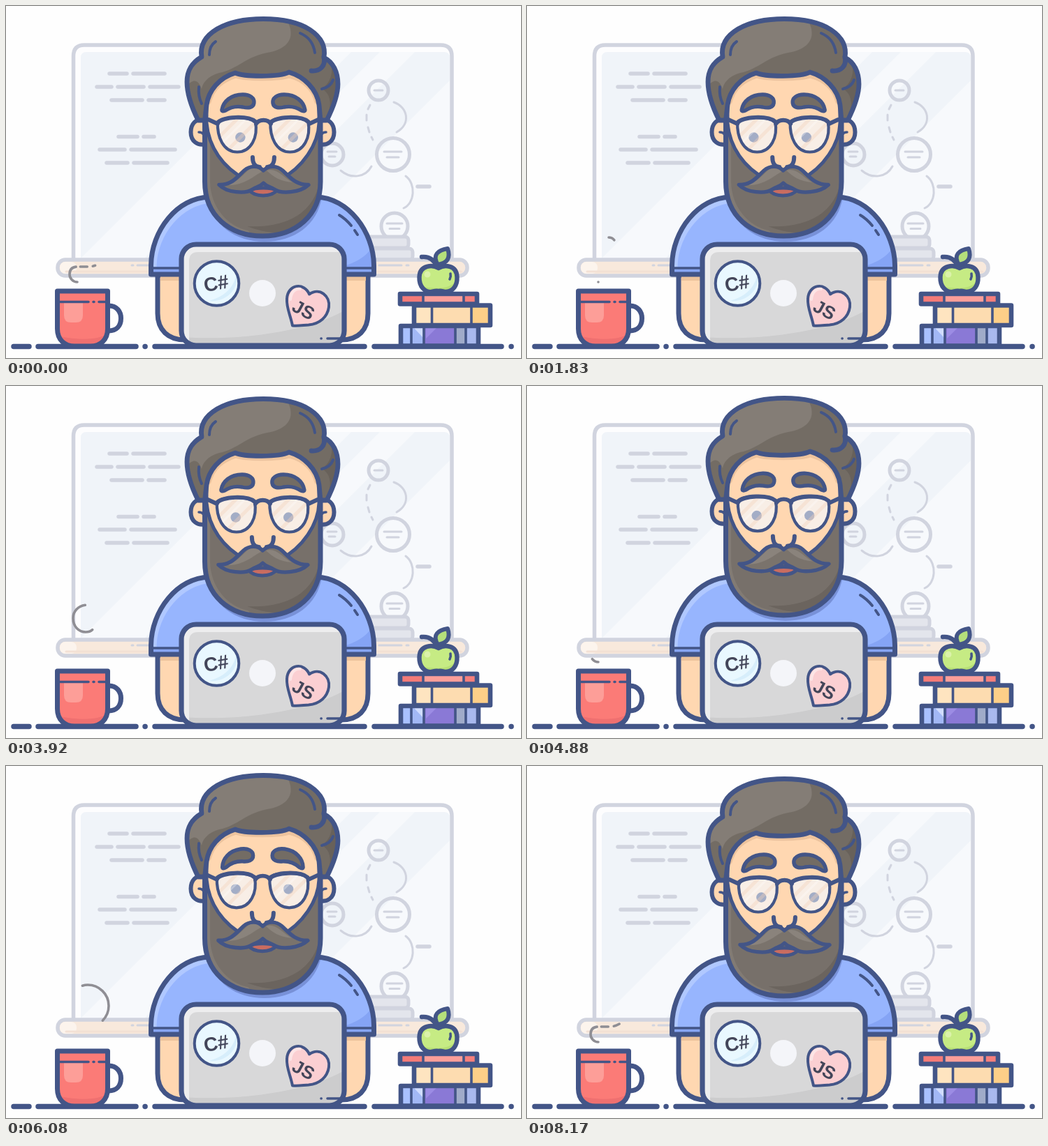
Recreate the animation shown at these times as an HTML page with a canvas. Size 737 by 505 pixels, loop 8.21 s.

```html
<!DOCTYPE html>
<html lang="en">
<head>
<meta charset="utf-8">
<title>Developer at work</title>
<style>
html, body { margin: 0; width: 100%; height: 100%; overflow: hidden; background: #fefefe; }
canvas { display: block; }
</style>
</head>
<body>
<canvas id="stage" width="737" height="505"></canvas>
<script>
const ctx = document.getElementById('stage').getContext('2d');
const LOOP = 8210;
const INK = '#435587', SKIN = '#ffd7b1', HAIR = '#736c64', HAIR_LIGHT = '#847d76';
const GREY = '#d1d4df', PALE = '#f0f4f9', SHIRT = '#97b5fe';

// ---------- drawing helpers ----------
function shape(d, fill, stroke, width) {
  const p = new Path2D(d);
  if (fill) { ctx.fillStyle = fill; ctx.fill(p); }
  if (stroke) { ctx.strokeStyle = stroke; ctx.lineWidth = width; ctx.stroke(p); }
}
const line = (d, width, color = INK) => shape(d, null, color, width);
function circle(x, y, r, fill, stroke, width) {
  ctx.beginPath();
  ctx.arc(x, y, r, 0, Math.PI * 2);
  if (fill) { ctx.fillStyle = fill; ctx.fill(); }
  if (stroke) { ctx.strokeStyle = stroke; ctx.lineWidth = width; ctx.stroke(); }
}
function box(x, y, w, h, r, fill, stroke, width) {
  ctx.beginPath();
  ctx.roundRect(x, y, w, h, r);
  if (fill) { ctx.fillStyle = fill; ctx.fill(); }
  if (stroke) { ctx.strokeStyle = stroke; ctx.lineWidth = width; ctx.stroke(); }
}
function group(fn) { ctx.save(); fn(); ctx.restore(); }
function clipTo(d, fn) {
  group(() => { ctx.clip(new Path2D(d)); fn(); });
}
function mirrored(axis, fn) {
  fn();
  group(() => { ctx.translate(axis * 2, 0); ctx.scale(-1, 1); fn(); });
}
function label(text, x, y, size, angle) {
  group(() => {
    ctx.translate(x, y);
    ctx.rotate(angle);
    ctx.font = `bold ${size}px "Liberation Sans", Arial, sans-serif`;
    ctx.textAlign = 'center';
    ctx.textBaseline = 'middle';
    ctx.fillStyle = '#434559';
    ctx.fillText(text, 0, 0);
  });
}

// ---------- timing ----------
const sine = u => 0.5 - 0.5 * Math.cos(Math.PI * Math.min(1, Math.max(0, u)));
function keyed(t, keys) {
  for (let i = 1; i < keys.length; i++) {
    const [t0, a] = keys[i - 1], [t1, b] = keys[i];
    if (t < t1) return a + (b - a) * sine((t - t0) / (t1 - t0));
  }
  return keys[keys.length - 1][1];
}
const LOOK = [[0, 5.8], [250, 5.8], [1250, -5], [2550, -5], [3450, -0.8], [7270, -0.8], [8120, 5.8]];
const LIFT = [[0, 0], [4600, 0], [5500, 1], [7270, 1], [8120, 0]];

// ---------- background ----------
function sheen(from, to) {
  shape(`M${from - 40} 40L${to - 40} 40L${to - 380} 380L${from - 380} 380Z`, 'rgba(255,255,255,.5)');
}
function board() {
  shape('M96.500 364V72Q96.500 56 112 56H622Q638 56 638 72V364Z', '#fdfdfe');
  clipTo('M107 364V74Q107 66 115 66H627Q635 66 635 74V364Z', () => {
    ctx.fillStyle = PALE;
    ctx.fillRect(90, 50, 560, 320);
    sheen(469, 560);
    sheen(601, 651);
    sheen(742, 1100);
  });
  line('M96.500 364V72Q96.500 56 112 56H622Q638 56 638 72V364', 5.5, GREY);
  line('M148 97H173M182 97H227M130 116H151M160 116H197M206 116H247M151 135H195M204 135H227' +
    'M161 187.500H188M197 187.500H212M134 206H170M179 206H242M144 225H174M183 225H231M589 259H606', 5.5, GREY);
  circle(533, 121, 14, null, GREY, 5);
  circle(554, 213, 23.5, null, GREY, 5);
  circle(467, 213, 16, null, GREY, 5);
  circle(556, 316, 19, null, GREY, 5);
  line('M527 121H539M541 209H566M545 217H562M460 209H473M462 216H471M545 312H567M549 319.500H563', 3, GREY);
  line('M555 138C575 145 580 169 559 181M521 142L518 148M516 156V164M518 174L520 181M523 188L525 192' +
    'M479 236C493 248 514 247 523 230M572 244C587 255 585 283 569 290', 3, GREY);
  box(500, 331, 76, 16, 5, '#e3e5ec', GREY, 5);
  box(500, 348, 82, 16, 5, '#e3e5ec', GREY, 5);
}
function ledge() {
  box(74, 364, 586, 23, 11, '#f8e9dc', GREY, 5.5);
  box(77, 367, 24, 17, 8, '#fcf4ed');
  line('M86 381H652', 3, '#f3e1d5');
  line('M180 372H182M188 372H206M534 372H566M573 372H576', 3, GREY);
}
function desk() {
  line('M11 488.500H33M46 488.500H186M199 488.500H199.100M213 488.500H513M527 488.500H709M723 488.500H723.100', 7.5);
}

// ---------- steam ----------
const STEAM = 'M102 396C96 396 91 391 91 385C91 378 95 374 102 374H118C134 374 147 360 147 344' +
  'C147 327 133 314 117 314C105 314 96 322 96 333C96 345 104 353 114 353C121 353 127 349 127 342C127 336 122 332 117 332';
const steamPath = new Path2D(STEAM);
const steamNode = document.createElementNS('http://www.w3.org/2000/svg', 'path');
steamNode.setAttribute('d', STEAM);
const steamLength = steamNode.getTotalLength();
const CYCLE = 2710, steamRuns = [[0, 33], [39, 49], [57, steamLength]];

function steam(age) {
  const head = sine(age / 2650) * steamLength;
  const tail = Math.max(0, (age - 1000) / 1790) * steamLength;
  ctx.strokeStyle = '#8f8e94';
  ctx.lineWidth = 3.6;
  for (const [a, b] of steamRuns) {
    const from = Math.max(a, tail), to = Math.min(b, head);
    if (to <= from) continue;
    ctx.setLineDash([to - from, 999]);
    ctx.lineDashOffset = -from;
    ctx.stroke(steamPath);
  }
  ctx.setLineDash([]);
}

// ---------- desk objects ----------
function mug() {
  const body = 'M73.500 409H145.500V463C145.500 479 135 488 121 488H98C84 488 73.500 479 73.500 463Z';
  line('M147 430C159 430 164.500 439 164.500 448C164.500 459 158 466 147 466', 7);
  shape(body, '#fb7b77');
  clipTo(body, () => {
    shape('M83 426H110V444Q110 454 100 454H93Q83 454 83 444Z', '#fd9e98');
    shape('M146 470C130 480 104 479 76 474V490H147Z', '#ef7070');
  });
  line(body, 7);
  line('M77 424.500H118M125 424.500H126M133 424.500H144', 3.6);
}
function books() {
  const blocks = [
    [565, 459, 15, 28, '#a9c1ff'], [580, 459, 19, 28, '#a2b8f5'], [599, 459, 44, 28, '#8a79d6'],
    [643, 459, 16, 28, '#a0abc9'], [659, 459, 17, 28, '#a9b9ee'],
    [584, 429, 26, 29, '#fee4c0'], [610, 429, 56, 29, '#fddcb0'], [666, 429, 27, 29, '#fdcf88'],
    [564, 413, 33, 15, '#f47b78'], [597, 413, 58, 15, '#fd9e99'], [655, 413, 19, 15, '#f67f7c']
  ];
  for (const [x, y, w, h, c] of blocks) { ctx.fillStyle = c; ctx.fillRect(x, y, w, h); }
  shape('M582 460H597V476Z', '#d0dcff');
  shape('M601 460H618L601 477Z', '#9c8ce4');
  line('M580 461V486M598 461V486M643 461V486M658 461V486M609.500 431V456M666 431V456M597 415V426M655 415V426', 3.6);
  line('M565 459H676V487.500H565Z M584 429.500H693V458H584Z M564 413H674V427.500H564Z', 6.6);
}
function apple() {
  const fruit = 'M619 376C611 371 592 371 591.500 389C591 403 600 411 609 410C613 409 616 408 619 409' +
    'C623 408 626 410 630 410C640 409 646 401 645.500 389C645 371 627 371 619 376Z';
  shape(fruit, '#c6eb84');
  clipTo(fruit, () => {
    shape('M645 392C640 404 622 407 598 403L600 415H648Z', '#b7df75');
    circle(603, 385, 4.5, '#dbf3aa');
  });
  line(fruit, 6.4);
  shape('M618 371C609 357 619 350 632 348C636 360 633 369 618 371Z', '#b4de7b', INK, 6);
  line('M595 360C604 359 612 363 617 374', 6.4);
  line('M636 384Q637 388 635 392', 3.6);
}

// ---------- body and laptop ----------
const TORSO = 'M207.500 385V372C208 322 245 275 291 274H444C490 275 526 324 526.500 372V385Z';
const JAW = 'M284.500 164V252C284.500 301 320 330 367 330C414 330 450 301 450 252V164';

function body(lift) {
  shape('M217 386V441C217 465 232 479 256 479V386Z', SKIN, INK, 7);
  shape('M518 386V441C518 465 504 479 480 479V386Z', SKIN, INK, 7);
  ctx.fillStyle = '#ecc29b';
  ctx.fillRect(221, 388, 28, 6);
  ctx.fillRect(487, 388, 28, 6);
  shape(TORSO, SHIRT);
  clipTo(TORSO, () => {
    line('M211 385V373C212 326 249 280 295 278', 9, '#b0c8ff');
    shape('M527 338C522 357 500 369 480 374V388H530Z', '#85a4f5');
    ctx.fillStyle = '#87a5f3';
    ctx.fillRect(206, 378, 324, 8);
    group(() => { ctx.translate(3, 8 - 5 * lift); shape(JAW, '#7891d8'); });
  });
  line(TORSO, 7);
  line('M210 376H248M488 376H525', 3.5);
  line('M477 300C484 304 489 309 494 315M499 322L503 328', 4);
}
function laptop() {
  box(251, 342, 233, 145, 21, '#d8d8d9');
  group(() => {
    ctx.beginPath();
    ctx.roundRect(254, 345, 227, 140, 18);
    ctx.clip();
    shape('M254 475C325 480 425 470 484 437V490H254Z', '#cccccd');
    line('M258 490V366Q258 349 275 349H490', 8, '#ededee');
  });
  box(251, 342, 233, 145, 21, null, INK, 7.2);
  line('M451 477H451.200M460 477H482', 3.6);
  circle(367, 412, 19, '#f4f5f9');

  circle(301.500, 398, 31.8, '#e9f8ff');
  shape('M330 383C334 404 318 425 291 423C315 416 327 402 330 383Z', '#d7eefb');
  circle(301.500, 398, 31.8, null, INK, 4);
  label('C#', 301, 399.5, 28, -0.17);

  shape('M410 458.500C407 443 401 433 402 420C403 399 427 396 434 413.500C449 403 464 416 462 432' +
    'C460 446 449 456 433 457.500C425 458 417 459.500 410 458.500Z', '#fbcfd2', INK, 4);
  line('M407 421C408 410 414 405 421 406', 4, '#fde5e6');
  label('JS', 425, 437.5, 26, 0.5);
}

// ---------- head ----------
function face() {
  mirrored(367, () => {
    shape('M286 163C271 160 264.500 170 264.500 181C264.500 194 274 201 286 198Z', SKIN, INK, 6);
    line('M276 181Q281 181 283 185', 3.6);
  });
  shape(JAW, '#77706a');
  clipTo(JAW, () => {
    line('M289 190V252C290 290 314 318 345 325', 6, '#827b74');
    shape('M450 240C447 296 402 319 345 316C380 330 420 330 455 300Z', '#6b645e');
  });
  const skin = 'M287 168V140C290 112 315 94 330 94H405C425 98 446 116 448 140V168C447 198 425 232 392 249' +
    'Q367 258 343 249C310 232 290 202 287 168Z';
  shape(skin, SKIN, INK, 5);
  line(JAW, 7);
  line('M291 138C297 117 309 108 329 101C342 106 392 106 405 101C425 106 439 118 444 138', 5, '#edc39d');
}
function hair() {
  const mass = 'M284.500 164H275C268 150 259 130 259 109C259 90 268 80 280 73C277 55 287 42 302 33' +
    'C321 22 345 18.500 368 18.500C393 18.500 418 23 435 34C450 44 458 57 455 74C468 80 475 95 475 112C475 130 466 150 459 164H450' +
    'L448 142C445 119 426 101 405 95C391 102 342 102 328 96C305 103 290 121 287 142Z';
  shape(mass, HAIR);
  clipTo(mass, () => {
    shape('M255 120C261 88 280 75 277 62L290 15H399C417 43 405 60 379 66C342 72 332 91 305 96' +
      'C288 101 281 111 280 119C275 105 267 102 255 120Z', HAIR_LIGHT);
    shape('M462 76C471 91 465 110 452 119C463 124 467 139 461 153L479 135V85Z', '#68615a');
  });
  line(mass, 6.8);
  line('M455 73C458 86 449 94 437 93', 6.8);
  line('M291 70C291 61 294 55 300 51M421 39C433 44 440 53 442 67M276 116C275 126 277 134 280 140M452 119C460 117 466 112 468 106', 4);
}
function brows(lift) {
  mirrored(367.5, () => group(() => {
    ctx.translate(332, 139 - lift);
    ctx.rotate(-0.15 * lift);
    shape('M-24 10C-22 -2 -11 -12 6 -12C16 -12 23 -7 22 0C21 7 14 8 6 6C-5 4 -13 7 -19 11Q-24 13 -24 10Z', HAIR, INK, 5.4);
  }));
}
const LENS = 'M302 166C311 158 346 158 356 166C360 188 350 209.500 330 209.500C310 209.500 301 188 302 166Z';
function glasses(look, lift) {
  for (const dx of [0, 75.5]) group(() => {
    ctx.translate(dx, 0);
    shape(LENS, '#f8eee6');
    clipTo(LENS, () => {
      circle(329.500 + look * 0.85, 188.5 - 5.7 * lift, 7.2, '#a3adc6');
      line('M294 198L334 158M309 214L364 159', 5, 'rgba(242,208,184,.38)');
      line('M299 206L351 154', 3, 'rgba(255,255,255,.3)');
    });
    line(LENS, 4.2);
    line('M302 168C309 158 346 157 356 166', 6);
  });
  line('M357 169C361 162 374 162 378 169M289 163L302 169M446 163L433 169', 5.8);
}
function whiskers() {
  shape('M347 264C358 260 377 260 387 264C379 274.500 355 274.500 347 264Z', '#c96c60', INK, 5);
  line('M352 217C352 226 356 231 362 231M383 217C383 226 379 231 373 231', 6);
  const tache = 'M367.500 236C360 228 348 229 340 236C329 246 322 257 304 256.500C315 268 342 270 352 263' +
    'C358 259 362 260 367.500 254C373 260 377 259 383 263C393 270 420 268 432 256.500C414 257 406 246 395 236C387 229 375 228 367.500 236Z';
  shape(tache, '#7a736c');
  clipTo(tache, () => {
    shape('M315 257C337 252 342 231 358 231L365 238C354 243 341 258 315 257Z M372 236C386 231 397 247 409 253C391 252 381 244 372 236Z', '#8a837c');
  });
  line(tache, 5.4);
}
function head(look, lift) {
  group(() => {
    ctx.translate(0, -5 * lift);
    face();
    hair();
    ctx.translate(look * 0.16, -1.2 * lift);
    brows(lift);
    glasses(look, lift);
    whiskers();
  });
}

// ---------- scene ----------
function draw(t) {
  const look = keyed(t, LOOK), lift = keyed(t, LIFT);
  const age = (t + 885) % CYCLE;
  ctx.fillStyle = '#fefefe';
  ctx.fillRect(0, 0, 737, 505);
  ctx.lineCap = ctx.lineJoin = 'round';
  board();
  ledge();
  steam(age);
  if (age < 80) steam(age + CYCLE);
  desk();
  body(lift);
  head(look, lift);
  laptop();
  mug();
  books();
  apple();
}
const start = performance.now();
function tick() {
  draw((performance.now() - start) % LOOP);
  requestAnimationFrame(tick);
}
tick();
</script>
</body>
</html>
```
